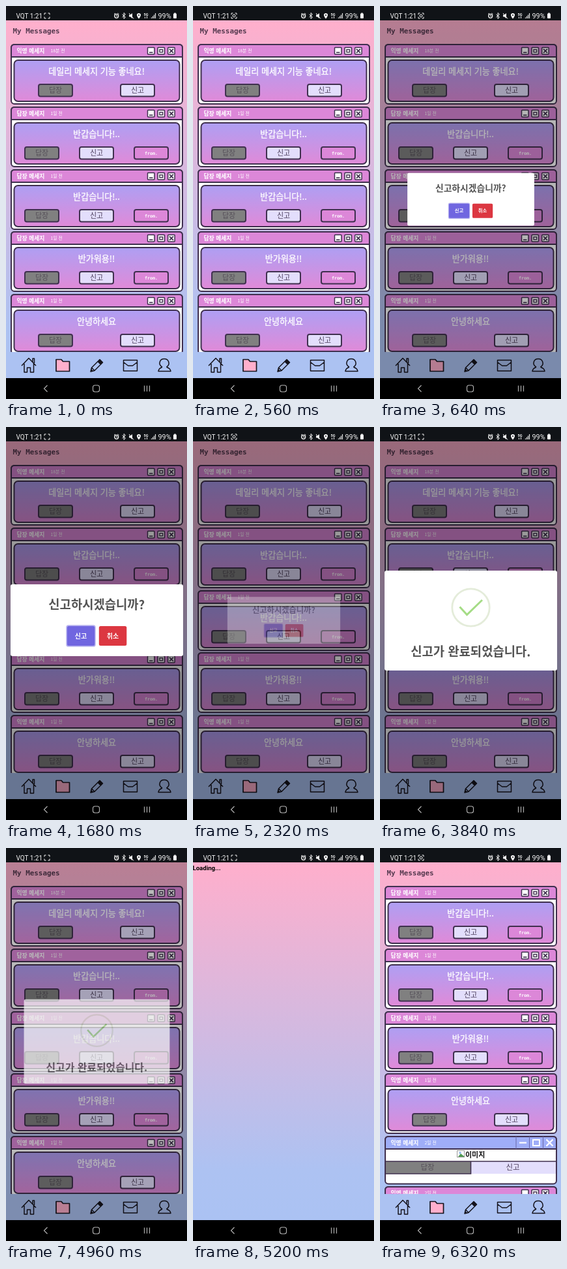
An HTML page that plays this animation: 278 by 602 pixels, repeating every 6.8 s.

```html
<!DOCTYPE html>
<html lang="ko">
<head>
<meta charset="utf-8">
<title>My Messages</title>
<style>
  html, body { margin: 0; width: 100%; height: 100%; overflow: hidden; background: #000; }
  svg { display: block; width: 100vw; height: 100vh; }
  text { font-family: "Noto Sans CJK KR", "Noto Sans CJK", sans-serif; white-space: pre; }
  .mono { font-family: "DejaVu Sans Mono", monospace; }
  .ui { font-family: Roboto, sans-serif; }
</style>
</head>
<body>
<svg viewBox="0 0 278 602" preserveAspectRatio="none">
  <defs>
    <linearGradient id="sky" x1="0" y1="0" x2="0" y2="1">
      <stop offset="0" stop-color="#ffafcc"/>
      <stop offset=".86" stop-color="#adc2f2"/>
      <stop offset="1" stop-color="#abc2f3"/>
    </linearGradient>
    <linearGradient id="panel" x1="0" y1="0" x2="0" y2="1">
      <stop offset="0" stop-color="#ae9ff3"/>
      <stop offset="1" stop-color="#e08ad8"/>
    </linearGradient>
    <clipPath id="scroller"><rect y="50" width="278" height="480"/></clipPath>
  </defs>
  <rect y="22" width="278" height="548" fill="url(#sky)"/>
  <g id="page"></g>
  <text id="loading" class="ui" x="-.5" y="33.5" font-size="9.6" font-weight="700">Loading...</text>
  <rect id="backdrop" y="22" width="278" height="548"/>
  <g id="confirm"></g>
  <g id="done"></g>
  <g id="system"></g>
</svg>
<script>
const LOOP = 6800;
const INK = '#40304f', PINK = '#dc87d8', LILAC = '#e3defc', GREY = '#808080', GREEN = '#a5dc86';
const $ = id => document.getElementById(id);

const rect = (x, y, w, h, fill, extra = '') =>
  `<rect x="${x}" y="${y}" width="${w}" height="${h}" fill="${fill}" ${extra}/>`;
const line = (d, stroke, width, extra = '') =>
  `<path d="${d}" fill="none" stroke="${stroke}" stroke-width="${width}" ${extra}/>`;
const text = (s, x, y, size, fill, extra = '') =>
  `<text x="${x}" y="${y}" font-size="${size}" fill="${fill}" ${extra}>${s}</text>`;
const MID = 'text-anchor="middle"', BOLD = 'font-weight="700"';
const outline = (radius, width = 2) => `rx="${radius}" stroke="${INK}" stroke-width="${width}"`;

function button(label, x, y) {
  const style = {
    '답장': [GREY, '#565059'],
    '신고': [LILAC, '#4a3c58'],
    'from.': [PINK, '#fff'],
  }[label];
  const caption = label === 'from.'
    ? text(label, x + 26, y + 11.7, 6.7, style[1], `${MID} class="mono" ${BOLD}`)
    : text(label, x + 26, y + 13.4, 11, style[1], MID);
  return rect(x, y, 52, 18.5, style[0], outline(3)) + caption;
}

function windowButtons(y) {
  const box = x => rect(x, y + 5.5, 10.5, 10.5, '#fff', outline(1, 1.5));
  return [217.5, 233, 248.7].map(box).join('') +
    line(`M220 ${y + 13.2}h5.5`, INK, 1.6) +
    rect(236, y + 8.8, 4.6, 4, 'none', `stroke="${INK}" stroke-width="1.4"`) +
    line(`M251 ${y + 7.8}l6 6m0 -6l-6 6`, INK, 1.7);
}

const heading = (kind, age, y) =>
  text(`${kind} 메세지`, 16.5, y + 13.6, 8.8, '#fff', BOLD) +
  text(age, 68.5, y + 13, 6.8, '#fff');

const frame = (y, height, barColor) =>
  rect(8, y + 1, 263, height, '#fff', outline(5)) +
  `<path d="M8 ${y + 20}v-14q0 -5 5 -5h253q5 0 5 5v14z" fill="${barColor}" stroke="${INK}" stroke-width="2"/>`;

function card(y, kind, age, message) {
  const labels = kind === '답장' ? ['답장', '신고', 'from.'] : ['답장', '신고'];
  const xs = kind === '답장' ? [29, 113, 197] : [50, 176];
  return frame(y, 91, PINK) + heading(kind, age, y) + windowButtons(y) +
    rect(12.5, y + 25, 254, 63, 'url(#panel)', outline(6)) +
    text(message, 139, y + 47, 13.1, '#fff', MID + ' stroke="#fff" stroke-width=".3"') +
    labels.map((label, i) => button(label, xs[i], y + 62)).join('');
}

function brokenImage() {
  return rect(118.5, 463.5, 11, 10, '#fff', 'stroke="#9a9a9a"') +
    '<path d="M120 473l4 -5 6 5z" fill="#4f9a50"/><circle cx="123" cy="467" r="1.8" fill="#8fb6ea"/>' +
    text('이미지', 131, 474, 11, '#111', BOLD);
}

function imageCard(y) {
  return frame(y, 72.5, '#9fadf8') + heading('익명', '2일 전', y) +
    line(`M209 ${y + 1}v19m20.5 -19v19m21 -19v19`, '#6a68a8', 1) +
    line(`M214 ${y + 10.5}h11`, '#fff', 2.2) +
    rect(235, y + 6, 10, 9, 'none', 'stroke="#fff" stroke-width="2"') +
    line(`M255.5 ${y + 5.5}l10 10m0 -10l-10 10`, '#fff', 2.4) +
    `<g id="broken">${brokenImage()}</g><g id="imageButtons">` +
    rect(9, y + 39, 130.5, 19, GREY) + rect(139.5, y + 39, 130.5, 19, LILAC) +
    line(`M9 ${y + 39}h130.5v19h-130.5M139.5 ${y + 39}h131`, INK, 1.6) +
    text('답장', 73, y + 52.4, 11.4, '#565059', MID) +
    text('신고', 204, y + 52.4, 11.4, '#4a3c58', MID) + '</g>';
}

function navigation() {
  const icon = (d, width = 1.5) => line(d, '#15131c', width, 'stroke-linejoin="round"');
  return rect(0, 530, 278, 40, '#acc2f2') +
    icon('M24 551L35 539.5L46 551M28 548v13h4.5v-7h5v7h5v-13M41 545v-5h2.5v7') +
    `<path d="M77 559.5v-18h8l2.5 3h10v15z" fill="#ffafcc" stroke="#15131c" stroke-width="1.7" stroke-linejoin="round"/>` +
    icon('M130 560l1.5 -6 12.5 -12.5 4.5 4.5 -12.5 12.5zM131.5 554l4.5 4.5M141 544.5l4.5 4.5') +
    '<path d="M130 560l1 -4 3 3zM141 544.5l3 -3 4.5 4.5 -3 3z" fill="#15131c"/>' +
    icon('M180.5 542.5h21v16.5h-21zM181 546l6.5 5h7l6.5 -5') +
    icon('M240 553c-7 -4 -4 -12.5 3 -12.5s10 8.5 3.5 12.5M240 553c-4 2 -5.5 3 -6 6.5h19c-.5 -3.5 -2 -4.5 -6.5 -6.5');
}

function systemBars() {
  const w = '#f4f4f4', dim = '#b5b5b5';
  return rect(0, 0, 278, 22, '#101317') + rect(0, 570, 278, 32, '#000') +
    text('VQT 1:21', 15.5, 18.6, 10, w, 'class="ui"') +
    line('M59 13.5v-2.5h2.5M64.5 11h2.5v2.5M67 16.5v2.5h-2.5M61.5 19h-2.5v-2.5', w, 1) +
    `<g id="dot"><circle cx="63" cy="15" r="2" fill="none" stroke="${w}"/></g>` +
    `<circle cx="169.7" cy="15.3" r="3" fill="none" stroke="${w}" stroke-width="1.3"/>` +
    line('M169.7 13.5v2h1.5M166 12.5l2 -1.5M173.4 12.5l-2 -1.5', w, 1) +
    line('M178.5 12.8l5 4.4 -2.5 2.3v-9l2.5 2.3 -5 4.4', w, 1) +
    `<path d="M189 13.5h2l3 -2.5v8l-3 -2.5h-2z" fill="${w}"/>` + line('M189 11l7 8.5', w, 1) +
    `<path d="M204 19.5c-4.5 -5 -3.5 -8.5 0 -8.5s4.5 3.5 0 8.5z" fill="${w}"/><circle cx="204" cy="14" r="1" fill="#101317"/>` +
    text('5G', 211.5, 15, 5.6, w, 'class="ui" ' + BOLD) +
    line('M213.5 19v-2.5M216.5 15.5v3.5', w, 1) +
    line('M223.5 19v-1.5M225.5 19v-3.5M227.5 19v-5.5M229.5 19v-8', w, 1.1) +
    text('99%', 233.5, 18.6, 10.9, w, 'class="ui"') +
    rect(257, 11.5, 5, 7.5, w, 'rx="1"') + rect(258.3, 10.5, 2.4, 1.5, w) +
    line('M63.5 581l-5 5 5 5', dim, 1.1) +
    rect(133.5, 581, 10, 10, 'none', `rx="3" stroke="${dim}" stroke-width="1.1"`) +
    line('M212.5 581.5v9M216.5 581.5v9M220.5 581.5v9', dim, 1.1);
}

const pitch = i => Math.round(58 + 95.75 * i);
const hello = ['답장', '1일 전', '반갑습니다!..'];
const glad = ['답장', '1일 전', '반가워용!!'];
const greet = ['익명', '1일 전', '안녕하세요'];
const praise = ['익명', '18분 전', '데일리 메세지 기능 좋네요!'];
const stack = cards => cards.map((c, i) => card(pitch(i), ...c)).join('');

$('page').innerHTML =
  text('My Messages', 10.5, 41.5, 10.9, '#54394f', 'class="mono" ' + BOLD) +
  '<g clip-path="url(#scroller)">' +
  `<g id="before">${stack([praise, hello, hello, glad, greet])}</g>` +
  `<g id="after">${stack([hello, hello, glad, greet])}${imageCard(pitch(4))}${card(518, '익명', '2일 전', '')}</g>` +
  '</g>' + navigation();

const title = (s, y) => text(s, 139.3, y, 18.8, '#545454', `${MID} ${BOLD}`);
const alertButton = (label, x, fill) =>
  rect(x, 305, 42.5, 30, fill, 'rx="2.5"') +
  text(label, x + 21.25, 323.6, 10, '#fff', `${MID} ${BOLD}`);
$('confirm').innerHTML =
  rect(7, 241, 265, 110, '#fff', 'rx="3"') +
  title('신고하시겠습니까?', 279.3) +
  rect(92.3, 303.3, 45.4, 33.4, '#b7b2ef', 'rx="3.5"') +
  alertButton('신고', 93.8, '#7066e0') + alertButton('취소', 142.8, '#dc3741');

$('done').innerHTML =
  rect(7, 220, 265, 153, '#fff', 'rx="3"') +
  '<circle cx="139.5" cy="276.5" r="28.7" fill="none" stroke="#e4ecda" stroke-width="2.8"/>' +
  line('', GREEN, 2.8, 'id="arc"') +
  line('M122.5 275.5L133.5 287.5L157 265', GREEN, 3, 'id="tick" pathLength="1" stroke-dasharray="1 2"') +
  title('신고가 완료되었습니다.', 351);
$('system').innerHTML = systemBars();

const clamp = v => Math.max(0, Math.min(1, v));
const span = (t, from, to) => clamp((t - from) / (to - from));
const mix = (a, b, p) => a + (b - a) * p;

// CSS "ease": cubic-bezier(.25, .1, .25, 1), solved by bisection.
function ease(x) {
  const curve = (a, b, u) => 3 * a * u * (1 - u) ** 2 + 3 * b * u * u * (1 - u) + u ** 3;
  let lo = 0, hi = 1;
  for (let i = 0; i < 18; i++) {
    const u = (lo + hi) / 2;
    if (curve(.25, .25, u) < x) lo = u; else hi = u;
  }
  return curve(.1, 1, lo);
}

function bounce(p) {
  if (p < .45) return mix(.7, 1.05, ease(p / .45));
  if (p < .8) return mix(1.05, .95, ease((p - .45) / .35));
  return mix(.95, 1, ease((p - .8) / .2));
}

const show = (id, on) => $(id).setAttribute('display', on ? 'inline' : 'none');

function popup(id, t, open, close, gone) {
  show(id, t >= open && t < gone);
  const leaving = ease(span(t, close, close + 150));
  const scale = bounce(span(t, open, open + 300)) * mix(1, .5, leaving);
  $(id).setAttribute('transform', `translate(139.5 296.3) scale(${scale}) translate(-139.5 -296.3)`);
  $(id).setAttribute('opacity', 1 - leaving);
}

function arcPath(from, to) {
  if (to - from < 1) return '';
  const point = a => {
    const r = a * Math.PI / 180;
    return `${139.5 + 28.7 * Math.cos(r)} ${276.5 + 28.7 * Math.sin(r)}`;
  };
  return `M${point(from)}A28.7 28.7 0 0 1 ${point(to)}`;
}

const toggles = [240, 800, 1360, 1680, 2320, 2880, 3440, 3840, 4320, 4800, 5280, 5680, 6320];
const OPEN = 627, DONE = 2370, CLOSE = 4930, RELOAD = 5200, LISTED = 5280, IMAGE = 5520;

function draw(t) {
  show('dot', toggles.filter(at => at <= t).length % 2);

  const loading = t >= RELOAD && t < LISTED;
  show('loading', loading);
  show('page', !loading);
  show('before', t < RELOAD);
  show('after', t >= LISTED);
  show('broken', t >= IMAGE);
  $('imageButtons').setAttribute('transform', `translate(0 ${t < IMAGE ? -18 : 0})`);

  $('backdrop').setAttribute('opacity', .4 * (span(t, 568, 668) - span(t, CLOSE, CLOSE + 100)));
  popup('confirm', t, OPEN, 2260, DONE);
  popup('done', t, DONE, CLOSE, CLOSE + 150);

  // A white half-ring sweeps one turn, uncovering and then hiding the green half.
  const turn = 360 * ease(span(t, DONE + 212, DONE + 510));
  $('arc').setAttribute('d', turn < 180 ? arcPath(45 - turn, 45) : arcPath(-135, 225 - turn));
  const drawn = span(t, DONE + 405, DONE + 640);
  show('tick', drawn > 0);
  $('tick').setAttribute('stroke-dashoffset', 1 - drawn);
}

const start = performance.now();
function tick() {
  draw((performance.now() - start) % LOOP);
  requestAnimationFrame(tick);
}
tick();
</script>
</body>
</html>
```
